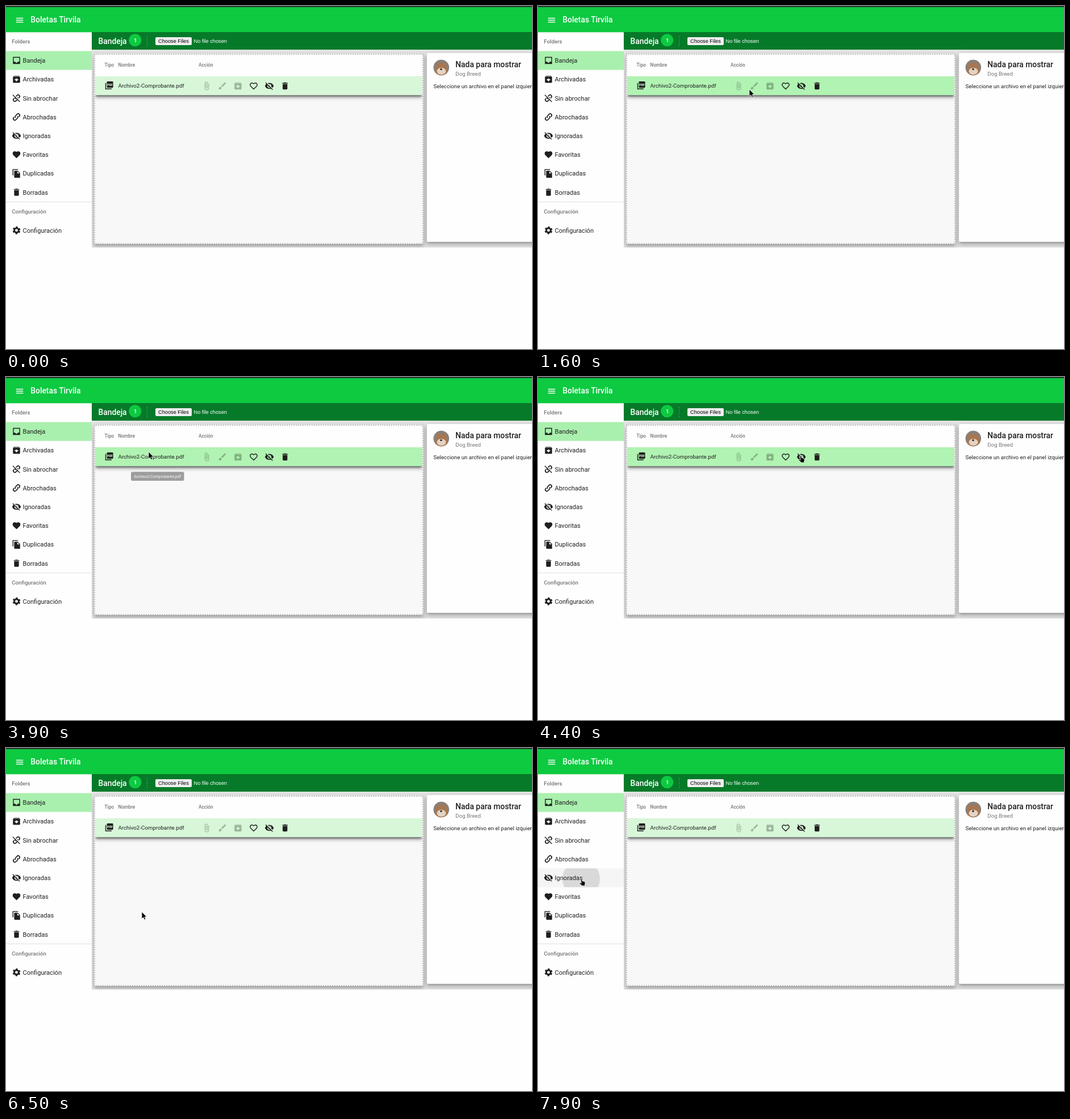
An HTML page that plays this animation: 926 by 605 pixels, repeating every 8 s.

```html
<!DOCTYPE html>
<html lang="es">
<head>
<meta charset="utf-8">
<style>
html, body { margin: 0; width: 926px; height: 605px; overflow: hidden; background: #fefefe; }
div, svg { position: absolute; box-sizing: border-box; }
svg { left: 0; top: 0; }
text { font-family: Roboto, sans-serif; white-space: pre; }
#content { left: 151px; top: 77px; width: 775px; height: 349px; background: #e6e6e6; overflow: hidden; }
.raised { box-shadow: 0 3.5px 3.5px -2px #0003, 0 5.5px 7px .7px #00000024, 0 2px 9.7px 1.4px #0000001f; }
#drop { left: 4px; top: 7px; width: 580px; height: 336px; background: #f8f8f8; border: 2px dotted #c4c4c4; }
#table { left: 6px; top: 9px; width: 576px; height: 71px; background: #fefefe;
  box-shadow: 0 3px 4px -1px #0008, 0 4px 7px #0005; clip-path: inset(0 0 -20px); }
#card { left: 590px; top: 6px; width: 210px; height: 333px; background: #fefefe; border-radius: 2px; }
</style>
</head>
<body>
<div id="content">
  <div id="drop" class="raised"></div>
  <div id="table"></div>
  <div id="card" class="raised"></div>
</div>
<svg id="stage" width="926" height="605" viewBox="0 0 926 605"></svg>
<script>
const K = 0.692, INK = '#1f1f1f', DIM = '#757575', ROW = 33.2;
const rowTop = i => 79.5 + ROW * i;

const rect = (x, y, w, h, fill, extra = '') =>
  `<rect x="${x}" y="${y}" width="${w}" height="${h}" fill="${fill}" ${extra}/>`;
const text = (x, y, size, str, fill = INK, extra = '') =>
  `<text x="${x}" y="${y}" font-size="${size * K}" fill="${fill}" ${extra}>${str}</text>`;
const bold = 'font-weight="500"';
const arial = 'style="font-family:Liberation Sans,Arial,sans-serif"';

// icons live on a 24 unit grid
const solid = d => `<path d="${d}" fill-rule="evenodd"/>`;
const line = (d, w = 2) => `<path d="${d}" fill="none" stroke="currentColor" stroke-width="${w}"/>`;
const ring = (r, w, extra = '') =>
  `<circle cx="12" cy="12" r="${r}" fill="none" stroke="currentColor" stroke-width="${w}" ${extra}/>`;
const slashed = shape => `<g mask="url(#cut)">${shape}</g>` + line('M2.6 3.6L20.4 21.4', 1.9);

const halfLink = line('M10 14.2A3.7 3.7 0 0 1 10 8.5L13.4 5A3.8 3.8 0 0 1 19 10.5L17.6 12', 2.4);
const link = halfLink + `<g transform="rotate(180 12 12)">${halfLink}</g>`;
const icons = {
  menu: line('M3 7h18M3 12h18M3 17h18'),
  inbox: line('M4 4h16v16H4z') + solid('M4 15h5a3 3 0 0 0 6 0h5v5H4z'),
  archive: solid('M6 3h12l3 3v13a2 2 0 0 1-2 2H5a2 2 0 0 1-2-2V6zM12 17.5L6.5 12H10V10h4v2h3.5zM5 5h14l-1-1H6z'),
  link,
  unlink: slashed(link),
  hidden: slashed(solid('M1 12C4 2 20 2 23 12C20 22 4 22 1 12zM7 12a5 5 0 1 0 10 0a5 5 0 1 0-10 0z') +
    '<circle cx="12" cy="12" r="3"/>'),
  heart: solid('M12 21.3L4.5 14C-1.5 8 5 0 12 5.1C19 0 25.5 8 19.5 14z'),
  heartLine: line('M12 20L5.2 13.4C0 8 6 1 12 6.5C18 1 24 8 18.8 13.4z'),
  copy: solid('M8 5h7l6 6v12H8a2 2 0 0 1-2-2V7a2 2 0 0 1 2-2zM14 6.5V12h5.5z') + line('M16 2H3V17'),
  trash: solid('M6 7h12v12a2 2 0 0 1-2 2H8a2 2 0 0 1-2-2zM5 4h3.5l1-1h5l1 1H19v2H5z'),
  gear: ring(5.6, 4.2) + ring(8.4, 3.2, 'pathLength="12" stroke-dasharray="1" stroke-dashoffset="-.5"'),
  pdf: line('M3 6V21H18') + rect(6, 2, 16, 16, 'currentColor', 'rx="2"') +
    '<text x="14" y="12.8" font-size="7.4" font-weight="900" text-anchor="middle" fill="#d7f7d8">PDF</text>',
  clip: line('M17.2 6V17.5a4.7 4.7 0 0 1-9.4 0V5a3.2 3.2 0 0 1 6.4 0V15.5a1.7 1.7 0 0 1-3.4 0V6', 1.5),
  brush: solid('M9 12.2L18.6 2.7Q20 2.4 21.3 5.4L11.8 15zM2 19Q4 19 4 17A3 3 0 0 1 10 17Q9.6 21 6 21Q3.4 21 2 19z')
};
const icon = (name, cx, cy, color = INK) =>
  `<g fill="${color}" color="${color}" transform="translate(${cx - 12 * K} ${cy - 12 * K}) scale(${K})">${icons[name]}</g>`;

const folders = { inbox: 'Bandeja', archive: 'Archivadas', unlink: 'Sin abrochar', link: 'Abrochadas',
  hidden: 'Ignoradas', heart: 'Favoritas', copy: 'Duplicadas', trash: 'Borradas' };
const actions = ['clip', 'brush', 'archive', 'heartLine', 'hidden', 'trash'];
const menuItem = (name, label, cy) => icon(name, 18.5, cy) + text(29.5, cy + 4.1, 16, label);
const fileName = 'Archivo2-Comprobante.pdf';

document.getElementById('stage').innerHTML = [
  '<clipPath id="face"><circle cx="766.3" cy="108.5" r="13.8"/></clipPath>',
  `<clipPath id="item">${rect(0, rowTop(4), 151, ROW, '#000')}</clipPath>`,
  `<mask id="cut" maskUnits="userSpaceOnUse" x="0" y="0" width="24" height="24">${rect(0, 0, 24, 24, '#fff')}
    <path d="M3.6 2L22 20.4" stroke="#000" stroke-width="2.4"/></mask>`,
  // bars
  rect(0, 0, 926, 2, '#20392a'), rect(0, 2, 926, 44.3, '#0dca41'),
  icon('menu', 24, 25, '#fff'), text(43.3, 29, 20, 'Boletas Tirvila', '#fff', bold),
  rect(151, 46, 775, 31, '#067a29'),
  text(162.5, 66.5, 20, 'Bandeja', '#fff', bold),
  '<circle cx="227.3" cy="60.3" r="11" fill="#0dca41"/>', text(225, 63.7, 14, '1', '#fff', bold),
  '<path d="M248.5 53V71" stroke="#3fae60" stroke-dasharray="2"/>',
  rect(263, 55, 64, 14, '#efefef', 'rx="2"'),
  text(268, 65.3, 13.33, 'Choose Files', '#000', arial),
  text(330.5, 65.3, 13.33, 'No file chosen', '#fff', arial),
  // sidebar
  rect(0, rowTop(0), 151, ROW, '#a9f0ae'),
  rect(0, 0, 151, ROW, '#f5f5f5', 'id="hover"'),
  '<g clip-path="url(#item)"><circle id="ripple" cx="76" cy="231" fill-opacity=".115"/></g>',
  text(10.3, 66.3, 14, 'Folders', DIM, bold),
  ...Object.entries(folders).map(([name, label], i) => menuItem(name, label, rowTop(i) + ROW / 2)),
  rect(0, 345, 151, 1, '#e0e0e0'),
  text(10.3, 365.8, 14, 'Configuración', DIM, bold),
  menuItem('gear', 'Configuración', 395.7),
  // file table
  text(173.5, 107.2, 12, 'Tipo', DIM, bold), text(197.5, 107.2, 12, 'Nombre', DIM, bold),
  text(339, 107.2, 12, 'Acción', DIM, bold),
  rect(157, 124, 576, 33.3, '#d7f7d8', 'id="row"'),
  icon('pdf', 181.7, 140), text(197.5, 144, 14, fileName),
  ...actions.map((name, i) => icon(name, 353.2 + 27.6 * i, 141, i < 3 ? 'rgba(0,0,0,.27)' : INK)),
  // preview card
  '<g clip-path="url(#face)">' + rect(752, 94, 29, 29, '#85807c'),
  '<path d="M757 108L759 98L766 102L774 98L776 108L780 124H753Z" fill="#a8764f"/>',
  '<ellipse cx="766.5" cy="115" rx="8" ry="6" fill="#e2d3c5"/><circle cx="766" cy="111.5" r="1.8" fill="#3b302b"/></g>',
  text(791.3, 107.9, 20, 'Nada para mostrar', INK, bold),
  text(791.3, 123, 14, 'Dog Breed', DIM),
  text(752.5, 145.2, 14, 'Seleccione un archivo en el panel izquierdo'),
  // overlays
  '<g id="tip">' + rect(220, 167.3, 93.5, 15.7, '#616161', 'rx="2.8"') + text(225.2, 177.7, 10, fileName, '#fff') + '</g>',
  '<g id="cursor" stroke="#fff" stroke-width=".7">',
  '<path id="arrow" d="M0 0V12.2L2.8 9.7L4.7 13.8L6.8 12.9L5 8.9H8.7Z"/>',
  '<path id="hand" d="M-1 0Q0-1.5 1 0L2 3.8L5 4.2Q7 5 7 7L6.3 12H1.8L-2.8 8Q-3 6.5-1.5 6.8L.3 7.6Z"/></g>'
].join('');

const FRAME = 100;
const origin = [183, 185];
// first and last step of each move, then where it ends
const moves = [
  [800, 1300, 374, 163], [1500, 1600, 372, 147], [3100, 3500, 251, 132], [4000, 4100, 466, 145], [4300, 4400, 462, 139],
  [6500, 6500, 239, 289], [6700, 6900, 74, 291], [7100, 7300, 74, 240], [7500, 7500, 74, 244], [7700, 7700, 76, 231]
];
const clamp = v => Math.min(1, Math.max(0, v));

function cursorAt(t) {
  let [x, y] = origin;
  for (const [start, end, toX, toY] of moves) {
    const p = clamp((t - start + FRAME) / (end - start + FRAME));
    x += (toX - x) * p;
    y += (toY - y) * p;
  }
  return [x, y];
}

const el = id => document.getElementById(id);
const show = (id, on) => el(id).setAttribute('visibility', on ? 'visible' : 'hidden');

function draw(now) {
  const t = Math.floor(now % 8000 / FRAME) * FRAME;
  const [x, y] = cursorAt(t);
  const visible = t >= moves[0][0];
  const onSidebar = visible && x < 151;
  const onRow = visible && x > 157 && y > 124 && y < 157;
  const pointing = onSidebar || onRow && x > 425;
  show('arrow', visible && !pointing);
  show('hand', pointing);
  show('hover', onSidebar);
  el('cursor').setAttribute('transform', `translate(${x} ${y})`);
  el('hover').setAttribute('y', rowTop(Math.floor((y - rowTop(0)) / ROW)));
  el('row').setAttribute('fill', onRow ? '#b1f3b3' : '#d7f7d8');
  el('tip').setAttribute('opacity', .9 * clamp((t - 3300) / 200) * clamp((4100 - t) / 300));
  el('ripple').setAttribute('r', 33 * clamp((t - 7600) / 300));
  requestAnimationFrame(draw);
}
requestAnimationFrame(draw);
</script>
</body>
</html>
```
